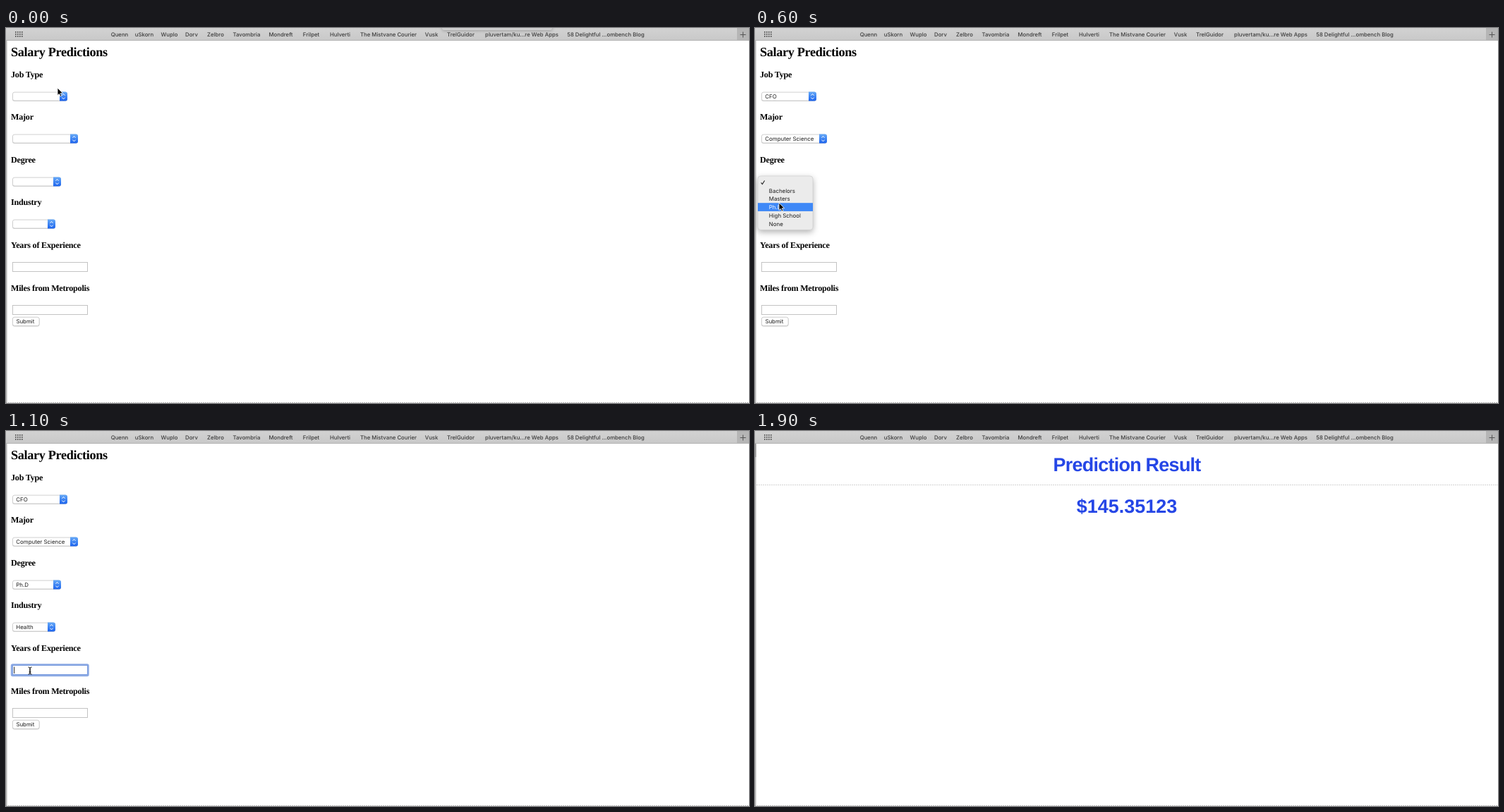
Animation, 1053 px wide and 532 px high, one loop 2000 ms. Source, as an HTML page:

```html
<!DOCTYPE html>
<html lang="en">
<head>
<meta charset="utf-8">
<title>Salary Predictions</title>
<style>
  html, body { margin: 0; width: 100%; height: 100%; overflow: hidden; background: #fff; }
  svg { display: block; position: absolute; left: 0; top: 0; }
  text { font-family: Inter, "Open Sans", sans-serif; font-size: 7.9px; fill: #1c1c1c; white-space: pre; text-rendering: geometricPrecision; }
  .bookmark { fill: #3b3b3b; text-anchor: middle; font-weight: 500; font-size: 7.75px; }
  .head { font: bold 12.1px "Liberation Serif", "Times New Roman", serif; letter-spacing: -.018em; fill: #000; }
  .title { font-size: 18.2px; }
  .result { font: bold 27px "Liberation Sans", Arial, sans-serif; fill: #2546e6; text-anchor: middle; }
  .tight { letter-spacing: -.028em; }
  .menu { filter: drop-shadow(0 3px 4px rgba(0, 0, 0, .3)); }
  .popover { filter: drop-shadow(0 1px 2px rgba(0, 0, 0, .25)); }
</style>
</head>
<body>
<svg id="stage" width="1053" height="532" viewBox="0 0 1053 532">
  <defs>
    <linearGradient id="bar" x2="0" y2="1">
      <stop stop-color="#d2d2d2"/><stop offset="1" stop-color="#c8c8c8"/>
    </linearGradient>
    <linearGradient id="blue" x2="0" y2="1">
      <stop stop-color="#66a9f7"/><stop offset="1" stop-color="#1b63ee"/>
    </linearGradient>
  </defs>
  <rect width="1053" height="532" fill="#fff"/>
  <g id="toolbar"></g>
  <g id="page"></g>
  <g id="pointer"></g>
</svg>
<script>
const STEP = 100, LOOP = 2000, ROW = 11.73;
const $ = id => document.getElementById(id);

const bookmarks = [
  ['Quenn', 161], ['uSkorn', 196], ['Wuplo', 231.5], ['Dorv', 263], ['Zelbro', 297],
  ['Tavombria', 341], ['Mondreft', 389.5], ['Frilpet', 432.5], ['Hulverti', 473.5],
  ['The Mistvane Courier', 542], ['Vusk', 603], ['TrelGuidor', 644.5],
  ['pluvertam/ku...re Web Apps', 731], ['58 Delightful ...ombench Blog', 850]
];

const selects = {
  job: { label: 'Job Type', y: 97, w: 78,
    items: ['CEO', 'CFO', 'CTO', 'Janitor', 'Junior', 'Manager', 'Senior', 'Vice President'] },
  major: { label: 'Major', y: 157, w: 93,
    items: ['Biology', 'Business', 'Chemistry', 'Computer Science', 'Engineering', 'Literature', 'Math', 'Physics', 'None'] },
  degree: { label: 'Degree', y: 218, w: 69,
    items: ['Bachelors', 'Masters', 'Ph.D', 'High School', 'None'] },
  industry: { label: 'Industry', y: 278, w: 61,
    items: ['Auto', 'Education', 'Finance', 'Health', 'Oil', 'Service', 'Web'] }
};

const inputs = {
  years: { label: 'Years of Experience', y: 339 },
  miles: { label: 'Miles from Metropolis', y: 400 }
};

// Each step lists only what changes; hover is a menu row, 0 being the blank one.
const steps = [
  { at: [73, 85], popover: true },
  { at: [43, 108], menu: 'job', hover: 2 },
  { at: [44, 156], job: 'CFO', menu: 'major', hover: 0 },
  { at: [44, 201], hover: 4, popover: false },
  { at: [40, 203], major: 'Computer Science', menu: null },
  { at: [36, 216], menu: 'degree', hover: 0 },
  { at: [34, 248], hover: 3 },
  { at: [35, 252], degree: 'Ph.D', menu: null },
  { at: [38, 270] },
  { at: [38, 271], menu: 'industry', hover: -1 },
  { at: [36, 322], hover: 4 },
  { at: [34, 340], industry: 'Health', menu: null, focus: 'years', beam: true },
  { years: '10' },
  { at: [34, 400], focus: 'miles' },
  { miles: '5' },
  { miles: '55' },
  { at: [32, 416], beam: false },
  {},
  { done: true },
  { at: null }
];

const text = (str, x, y, cls = '', extra = '') =>
  `<text x="${x}" y="${y}" class="${cls}" ${extra}>${str}</text>`;
const rect = (x, y, w, h, fill, extra = '') =>
  `<rect x="${x}" y="${y}" width="${w}" height="${h}" fill="${fill}" ${extra}/>`;
const line = (d, color, width = 1, extra = '') =>
  `<path d="${d}" fill="none" stroke="${color}" stroke-width="${width}" ${extra}/>`;

function drawToolbar(s) {
  let out = rect(0, 0, 1053, 18, 'url(#bar)') + rect(1036, 0, 17, 18, '#b5b5b5');
  for (let i = 0; i < 12; i++)
    out += rect(13 + i % 4 * 3, 5 + Math.floor(i / 4) * 3, 1.6, 1.6, '#454545');
  out += line('M1040.5 9.5H1048.5M1044.5 5.5V13.5', '#555');
  if (s.popover) out += rect(618, -8, 156, 11, '#d0d0d0', 'rx="3" class="popover"');
  out += line('M0 17.5H1053', '#b2b2b2');
  return out + bookmarks.map(([name, x]) => text(name, x, 11.8, 'bookmark')).join('');
}

function drawFrame(s) {
  return rect(0, 18, 1.6, 514, '#b9b9b9') + (s.done ? rect(0, 18, 1.6, 19, '#9a9a9a') : '') +
    line('M0 531.5H1053', '#b5b5b5', 1, 'stroke-dasharray="2 1"');
}

function drawSelect({ label, y, w }, value) {
  const right = 9 + w, mid = right - 5.5;
  return text(label, 7, y - 27, 'head') +
    rect(9, y - 5.6, w, 12.6, '#d4d4d4', 'rx="3"') +
    rect(9.5, y - 5.9, w - 1, 12, '#fff', 'rx="2.5" stroke="#c6c6c6" stroke-width=".8"') +
    `<path d="M${right - 11} ${y - 6.4}h8q3 0 3 3v7q0 3 -3 3h-8z" fill="url(#blue)"/>` +
    line(`M${mid - 2} ${y - 1.3}l2 -2.2l2 2.2M${mid - 2} ${y + 1.7}l2 2.2l2 -2.2`, '#fff') +
    text(value || '', 14.3, y + 3.1);
}

function drawInput({ label, y }, value = '', focused) {
  const ring = focused ? rect(8, y - 7.5, 108.5, 15.5, '#fff', 'rx="1.5" stroke="#8daae4" stroke-width="2.4"') : '';
  const caret = 11.7 + value.length * 5;
  return text(label, 7, y - 27, 'head') + ring +
    rect(9.5, y - 6.5, 106, 13, '#fff', `stroke="${focused ? '#6f94dc' : '#bdbdbd'}" stroke-width=".9"`) +
    text(value, 11.2, y + 3.2) +
    (focused ? line(`M${caret} ${y - 4.5}v9.5`, '#111', .9) : '');
}

function drawMenu({ y, w, items }, hover) {
  const top = y - 8, rows = ['', ...items];
  let out = rect(4, top, w + 9, rows.length * ROW + 6, '#ebebeb', 'rx="4" stroke="#c9c9c9" stroke-width=".6" class="menu"');
  rows.forEach((item, i) => {
    const rowTop = top + 3 + i * ROW;
    if (i === hover) out += rect(4, rowTop, w + 9, ROW, '#3e88f7');
    out += text(item, 19.8, rowTop + 8.9, '', i === hover ? 'style="fill:#fff"' : '');
  });
  return out + line(`M8.6 ${top + 9.3}l1.8 2.2l3.2 -5`, hover ? '#222' : '#fff', 1.1);
}

function drawForm(s) {
  let out = text('Salary Predictions', 7, 40.3, 'head title');
  for (const key in selects) out += drawSelect(selects[key], s[key]);
  for (const key in inputs) out += drawInput(inputs[key], s[key], s.focus === key);
  out += rect(9, 410.4, 38.5, 13, '#d0d0d0', 'rx="3"') +
    rect(9.4, 410.2, 37.7, 12.3, '#fff', 'rx="2.7" stroke="#c4c4c4" stroke-width=".8"') +
    text('Submit', 14.4, 419.3);
  return out + (s.menu ? drawMenu(selects[s.menu], s.hover) : '');
}

function drawResult() {
  return text('Prediction Result', 527, 57, 'result tight') +
    line('M2 76.5H1053', '#d2d2d2', 1, 'stroke-dasharray="2 1"') +
    text('$145.35123', 527, 115.5, 'result');
}

function drawPointer({ at, beam }) {
  if (!at) return '';
  const shape = beam
    ? line('M-2.5 -5q2.5 0 2.5 1.8V3.4q0 1.8 -2.5 1.8M2.5 -5q-2.5 0 -2.5 1.8V3.4q0 1.8 2.5 1.8M-1.5 2H1.5', '#111')
    : '<path d="M0 0V10.6L2.4 8.4L4 12L5.8 11.2L4.2 7.7H7.6Z" fill="#000" stroke="#fff" stroke-width=".8"/>';
  return `<g transform="translate(${at})">${shape}</g>`;
}

const states = [];
steps.reduce((prev, change) => {
  const next = { ...prev, ...change };
  states.push(next);
  return next;
}, {});

let shown = -1;
function render(now) {
  const index = Math.floor(now % LOOP / STEP);
  if (index === shown) return;
  const s = states[index];
  $('toolbar').innerHTML = drawToolbar(s);
  $('page').innerHTML = drawFrame(s) + (s.done ? drawResult() : drawForm(s));
  $('pointer').innerHTML = drawPointer(s);
  shown = index;
}

const start = performance.now();
function tick() {
  render(performance.now() - start);
  requestAnimationFrame(tick);
}
tick();
</script>
</body>
</html>
```
